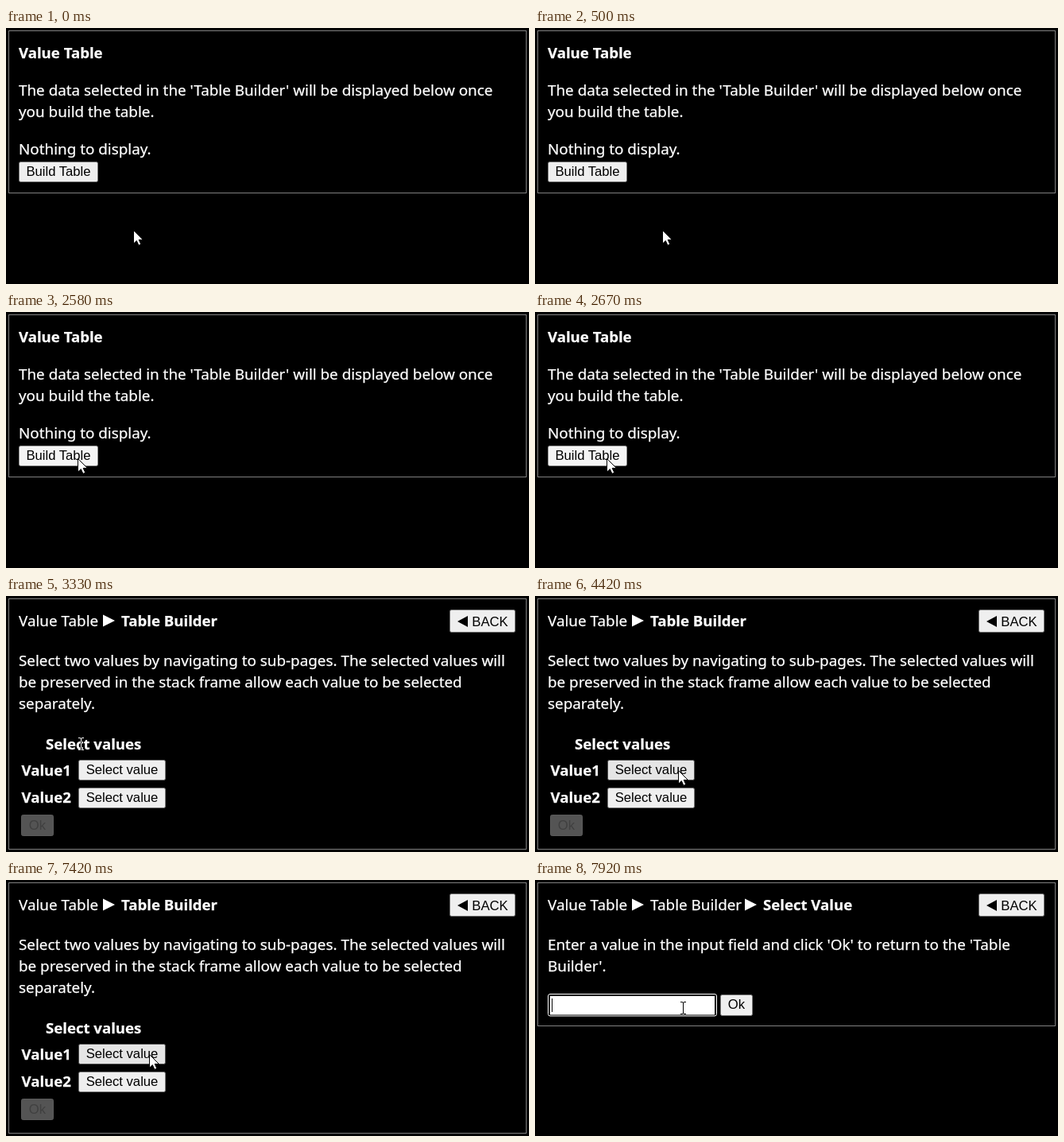
Write an HTML page that moves like this. It is 658x322 px and loops after 8000 ms.

```html
<!DOCTYPE html>
<html lang="en">
<head>
<meta charset="utf-8">
<title>Value Table</title>
<style>
  html, body { margin: 0; width: 100%; height: 100%; overflow: hidden; background: #000; }
  svg { display: block; isolation: isolate; }
  text { font: 18.85px "Noto Sans", "Open Sans", sans-serif; fill: #fff; stroke: #fff; stroke-width: .25px; white-space: pre; }
  .bold { font-size: 18.6px; font-weight: 700; }
  .btn rect { fill: #efefef; stroke: #767676; }
  .btn text { font: 16.667px "Liberation Sans", Arial, sans-serif; fill: #000; stroke: none; text-anchor: middle; }
  .btn.hover rect { fill: #e5e5e5; stroke: #4f4f4f; }
  .btn.down rect { fill: #f5f5f5; stroke: #8d8d8d; }
  .btn.off rect { fill: #545454; stroke: #5a5a5a; }
  .btn.off text { fill: #404040; }
  .panel { fill: #000; stroke: #808080; }
  .beam { fill: none; stroke: #fff; mix-blend-mode: difference; }
</style>
</head>
<body>
<svg id="stage" width="658" height="322" viewBox="0 0 658 322"></svg>
<script>
const NS = "http://www.w3.org/2000/svg";
const stage = document.getElementById("stage");
const LOOP = 8000, TICK = 1000 / 12;

function el(parent, tag, attrs, content) {
  const node = document.createElementNS(NS, tag);
  for (const key in attrs) node.setAttribute(key, attrs[key]);
  if (content) node.textContent = content;
  parent.appendChild(node);
  return node;
}

const buttons = [];

function screen(height) {
  const g = el(stage, "g", {});
  el(g, "rect", { class: "panel", x: 3.5, y: 3.5, width: 651, height });
  return g;
}

const label = (g, x, y, str, bold) =>
  el(g, "text", bold ? { x, y, class: "bold" } : { x, y }, str);

const lines = (g, y, list) => list.forEach((str, i) => label(g, 16, y + i * 27, str));

const arrow = (g, x) =>
  el(g, "path", { d: `M${x} 23.5l15 7.5l-15 7.5z`, fill: "#fff" });

function button(g, x, y, w, h, str, { off, textX = x + w / 2, base = y + 18 } = {}) {
  const node = el(g, "g", { class: off ? "btn off" : "btn" });
  el(node, "rect", { x: x + .5, y: y + .5, width: w - 1, height: h - 1, rx: 2 });
  el(node, "text", { x: textX, y: base }, str);
  if (!off) buttons.push({ g, node, x, y, w, h });
  return node;
}

function backButton(g) {
  const node = button(g, 558, 17, 83, 29, "BACK", { textX: 609, base: 38 });
  el(node, "path", { d: "M581 25v14l-13-7z" });
}

// Start page
const home = screen(204);
label(home, 16, 38, "Value Table", true);
lines(home, 85, [
  "The data selected in the 'Table Builder' will be displayed below once",
  "you build the table."
]);
label(home, 16, 159, "Nothing to display.");
button(home, 16, 168, 100, 26, "Build Table");

// Table builder
const builder = screen(315);
label(builder, 16, 38, "Value Table");
arrow(builder, 122);
label(builder, 145, 38, "Table Builder", true);
backButton(builder);
lines(builder, 88, [
  "Select two values by navigating to sub-pages. The selected values will",
  "be preserved in the stack frame allow each value to be selected",
  "separately."
]);
label(builder, 50, 193, "Select values", true);
label(builder, 19.5, 226, "Value1", true);
label(builder, 19.5, 260, "Value2", true);
button(builder, 91, 206, 110, 26, "Select value");
button(builder, 91, 241, 110, 26, "Select value");
button(builder, 19, 275, 41, 27, "Ok", { off: true, base: 294 });

// Value entry
const entry = screen(180);
label(entry, 16, 38, "Value Table");
arrow(entry, 122);
label(entry, 145, 38, "Table Builder");
arrow(entry, 264);
label(entry, 287, 38, "Select Value", true);
backButton(entry);
lines(entry, 88, [
  "Enter a value in the input field and click 'Ok' to return to the 'Table",
  "Builder'."
]);
el(entry, "rect", { x: 16.5, y: 143.5, width: 212, height: 27.5, rx: 2.5, fill: "#000", stroke: "#fff" });
el(entry, "rect", { x: 19, y: 146, width: 207, height: 23.5, fill: "#fff" });
el(entry, "path", { d: "M21.5 149v17", stroke: "#000" });
button(entry, 233, 144, 41, 27, "Ok");

const screens = [home, builder, entry];

// Pointers
const pointer = el(stage, "path", {
  d: "M.5 .5V17.2L4.3 13.6L6.9 19.4L9.8 18.1L7.2 12.4H12.4Z", fill: "#fff", stroke: "#000"
});
const beam = el(stage, "path", {
  class: "beam", d: "M-3 -7.5H-1Q.5 -7.5 .5 -6V6Q.5 7.5 -1 7.5H-3M4 -7.5H2Q.5 -7.5 .5 -6M.5 6Q.5 7.5 2 7.5H4"
});

// [start, end, x, y]
const moves = [
  [1245, 1246, 158, 254],
  [1995, 1996, 157, 253],
  [2170, 2500, 90, 184],
  [2700, 3000, 94, 186],
  [3590, 4410, 180, 219],
  [7670, 7910, 186, 161]
];
const presses = [[2580, 2700], [7580, 7665]];
const textAreas = [null, [50, 176, 121, 22], [17, 144, 211, 27]];

const ease = p => p * p * (3 - 2 * p);
const inside = (px, py, x, y, w, h) => px >= x && px < x + w && py >= y && py < y + h;

function position(t) {
  let x = 160, y = 254;
  for (const [from, to, tx, ty] of moves) {
    const p = ease(Math.min(1, Math.max(0, (t - from) / (to - from))));
    x += (tx - x) * p;
    y += (ty - y) * p;
  }
  return [Math.round(x), Math.round(y)];
}

function draw(time) {
  const t = Math.floor((time % LOOP + 5) / TICK) * TICK;
  const page = t < 2700 ? 0 : t < 7665 ? 1 : 2;
  const [x, y] = position(t);
  const pressed = presses.some(([a, b]) => t >= a && t < b);

  screens.forEach((g, i) => g.setAttribute("display", i === page ? "inline" : "none"));
  for (const b of buttons) {
    const over = b.g === screens[page] && inside(x, y, b.x, b.y, b.w, b.h);
    b.node.setAttribute("class", "btn" + (over ? pressed ? " down" : " hover" : ""));
  }

  const area = textAreas[page];
  const onText = area !== null && inside(x, y, ...area);
  const place = `translate(${x} ${y})`;
  pointer.setAttribute("transform", place);
  beam.setAttribute("transform", place);
  pointer.setAttribute("display", onText ? "none" : "inline");
  beam.setAttribute("display", onText ? "inline" : "none");
}

function frame() {
  draw(performance.now());
  requestAnimationFrame(frame);
}
frame();
</script>
</body>
</html>
```
